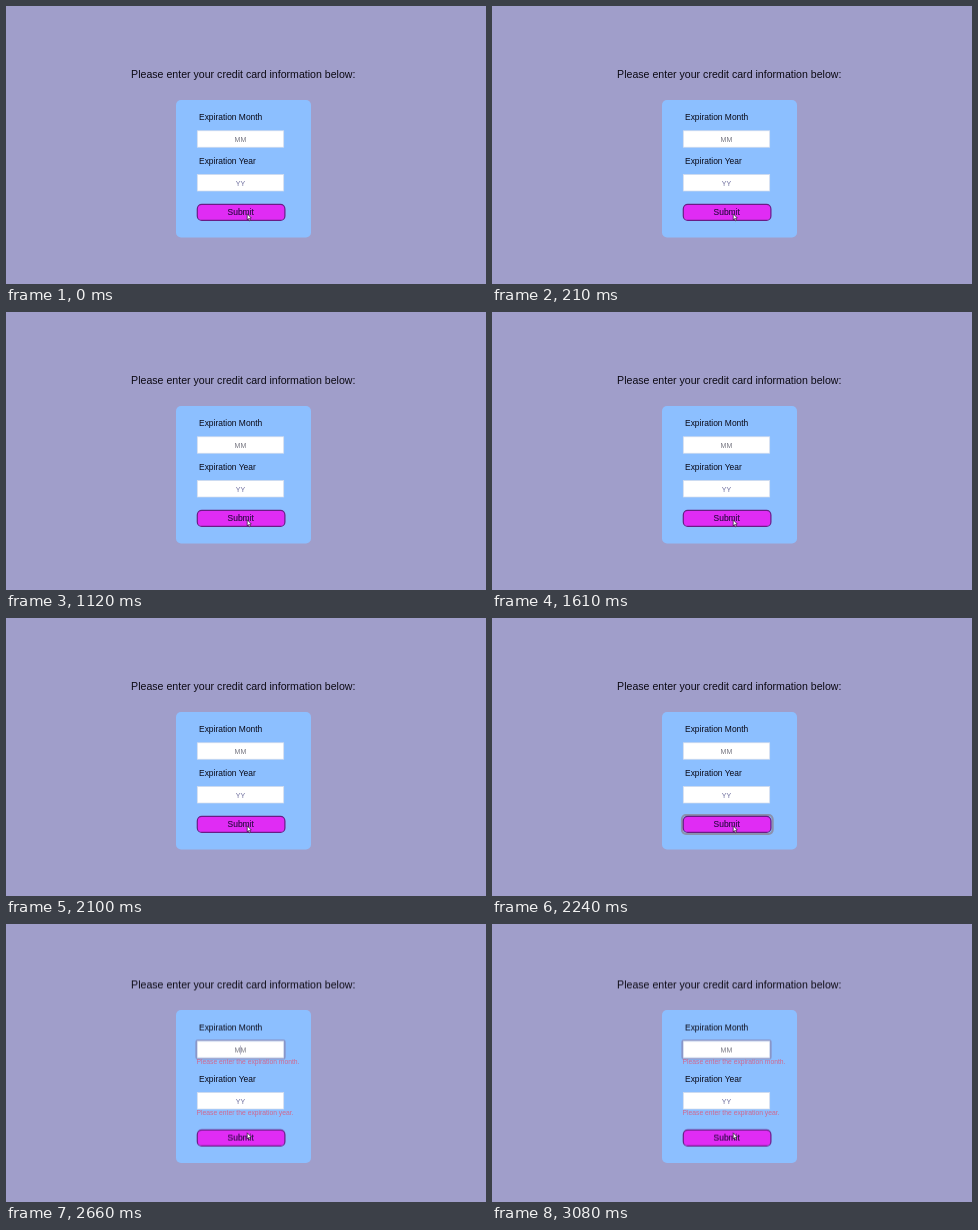
Write an HTML page that moves like this. It is 480 px wide and 278 px high and loops after 3150 ms.

```html
<!DOCTYPE html>
<html lang="en">
<head>
<meta charset="utf-8">
<title>Card form validation</title>
<style>
html, body { margin: 0; width: 100%; height: 100%; overflow: hidden; background: #a09eca; }
svg { display: block; width: 100%; height: 100%; font-family: "Liberation Sans", Arial, sans-serif; }
.title { font-size: 10.6px; text-anchor: middle; fill: #0c0a14; }
.label { font-size: 8.45px; fill: #0a0a18; }
.hint { font-size: 7px; text-anchor: middle; fill: #74747f; }
.error { font-size: 6.75px; fill: #d0688f; }
.submit { font-size: 8.45px; text-anchor: middle; fill: #300a48; stroke: #300a48; stroke-width: .15px; }
.card { fill: #8cbfff; }
.field { fill: #fff; stroke: #d5dcec; stroke-width: .7px; }
.button { fill: #e02cf4; stroke: #6a1c86; stroke-width: 1.2px; }
</style>
</head>
<body>
<svg viewBox="0 0 480 278">
  <text id="title" class="title" x="237.3" y="72.2">Please enter your credit card information below:</text>
  <rect class="card" x="170" y="94" width="135" height="137.5" rx="5"/>
  <rect id="tallCard" class="card" x="170" y="86" width="135" height="153" rx="5"/>

  <g id="month">
    <text class="label" x="193" y="114">Expiration Month</text>
    <rect id="focus" x="190.4" y="123.9" width="88.2" height="18.2" rx="1.5" fill="none" stroke="#8792c6" stroke-width="2"/>
    <rect class="field" x="191.3" y="124.8" width="86.4" height="16.4"/>
    <text class="hint" x="234.4" y="135.9">MM</text>
    <path id="caret" d="M234.5 129v9" stroke="#55557c" stroke-width=".8"/>
  </g>

  <text class="label" x="193" y="157.8">Expiration Year</text>
  <rect class="field" x="191.3" y="168.6" width="86.4" height="16.4"/>
  <text class="hint" x="234.4" y="179.6" style="fill:#6c6c9c">YY</text>

  <g id="errors" class="error">
    <text x="190.6" y="139.7">Please enter the expiration month.</text>
    <text x="190.6" y="191.2">Please enter the expiration year.</text>
  </g>

  <g id="submit">
    <rect id="ring" x="190" y="197" width="90.6" height="18.8" rx="4" fill="none" stroke="#8b91ad" stroke-width="2.2"/>
    <rect class="button" x="191.3" y="198.4" width="87.6" height="16" rx="4.5"/>
    <text class="submit" x="234.7" y="209.2">Submit</text>
  </g>
  <path id="cursor" d="M241.2 207.8l4.1 4.2-1.7.2 1 2.2-1.1.5-1-2.2-1.3 1.1z" fill="#fff" stroke="#241030" stroke-width=".7"/>
</svg>
<script>
const LOOP = 3150;
const INVALID = 2310;

// Each step is [start in ms, value]; values hold until the next step.
function play(id, property, steps) {
  const frames = steps.map(([ms, value]) => ({
    offset: ms / LOOP, [property]: value, easing: "step-end"
  }));
  frames.push({ offset: 1, [property]: steps[steps.length - 1][1] });
  document.getElementById(id).animate(frames, { duration: LOOP, iterations: Infinity });
}

const show = (id, ...steps) => play(id, "opacity", [[0, 0], ...steps]);
const shift = (id, y) => play(id, "transform", [
  [0, "translateY(0px)"], [INVALID, `translateY(${y}px)`]
]);

shift("title", -7.6);
shift("month", -7.5);
shift("submit", 7.6);
shift("cursor", 1);

show("tallCard", [INVALID, 1]);
show("errors", [INVALID, 1]);
show("focus", [INVALID, .8], [2380, 1]);
show("caret", [INVALID, 1], [2590, .75], [2660, .5], [2730, .25], [2800, 0]);
show("ring", [2170, .5], [2240, 1], [INVALID, 0]);
</script>
</body>
</html>
```
